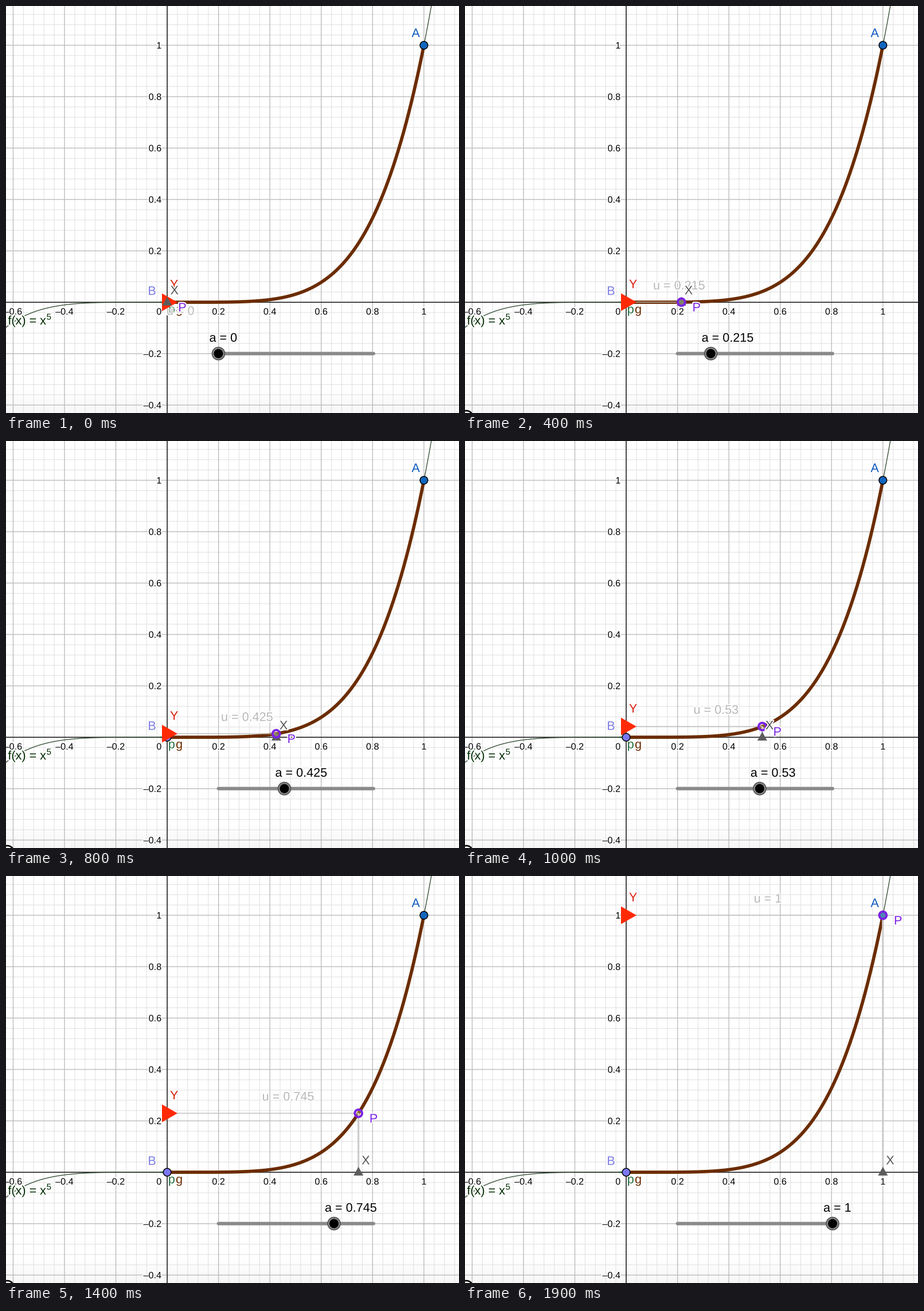
These frames come from a looping animation (790x709 px, 2 s). A matplotlib script:

```python
import numpy as np
import matplotlib.pyplot as plt
from matplotlib.animation import FuncAnimation
from matplotlib.patches import Circle, Polygon
from matplotlib.patheffects import withStroke

W, H = 790, 709
PT = 0.72                      # points per pixel at 100 dpi
OX, OY, UNIT = 281.1, 516.1, 447.7
BROWN, PURPLE = "#6b2c00", "#7b22e4"
BIG, SMALL = 21.6, 16.2        # text sizes in pixels
RAIL_Y = 605.5

plt.rcParams["font.family"] = "Liberation Sans"
fig = plt.figure(figsize=(W / 100, H / 100), dpi=100, facecolor="white")
ax = fig.add_axes([0, 0, 1, 1])
ax.axis("off")


def sx(x):
    return OX + UNIT * x


def sy(y):
    return OY - UNIT * y


def line(xs, ys, color, width, z, cap="butt"):
    # no snapping: lines keep their place between pixels
    return ax.plot(xs, ys, color=color, lw=width * PT, zorder=z,
                   solid_capstyle=cap, snap=False)[0]


def label(x, y, s, color, z, size=BIG, **kw):
    halo = [withStroke(linewidth=4 * PT, foreground="white")]
    return ax.text(x, y, s, color=color, fontsize=size * PT, zorder=z,
                   path_effects=halo, **kw)


def disc(x, y, r, face, edge, width, z):
    return ax.add_patch(Circle((x, y), r, fc=face, ec=edge, lw=width * PT, zorder=z))


def triangle(color, z):
    return ax.add_patch(Polygon(np.zeros((3, 2)), fc=color, ec="none", zorder=z))


def draw_grid():
    shade = np.linspace(1, 0.968, 45)[:, None, None] * np.ones((1, 1, 3))
    ax.imshow(shade, extent=(0, W, H, H - 45), aspect="auto", zorder=0)
    for k in range(-16, 30):
        major = k % 5 == 0
        color, width, z = ("#b9b9b9", 1.3, 2) if major else ("#e0e0e0", 1, 1)
        v = k * 0.04
        line([sx(v)] * 2, [0, H], color, width, z)
        line([0, W], [sy(v)] * 2, color, width, z)
    line([OX, OX], [0, H], "black", 1.3, 3)
    line([0, W], [OY, OY], "black", 1.3, 3)


def draw_ticks():
    for k in range(-3, 6):
        v = k / 5
        s = f"{v:g}".replace("-", "\u2013")
        if k:
            label(sx(v), 537.6, s, "black", 4, SMALL, ha="center")
        else:
            label(271.3, 537.6, s, "black", 4, SMALL, ha="right")
        if k and k > -3:
            label(271.3, sy(v) + 5.7, s, "black", 4, SMALL, ha="right")


def draw_curve():
    x = np.linspace(-0.66, 1.06, 500)
    line(sx(x), sy(x ** 5), "#2f4a30", 1.3, 5)
    label(3.4, 554.9, "f(x) = x", "#002a00", 6)
    label(70.6, 546.4, "5", "#002a00", 6, 15)
    x = np.linspace(0, 1, 300)
    line([269, OX], [OY, OY], "#24603a", 2.6, 6)
    line(sx(x), sy(x ** 5), BROWN, 5.7, 6)


draw_grid()
draw_ticks()
draw_curve()

label(282.8, 535.3, "p", "#23703f", 7)
label(296.1, 535.3, "g", BROWN, 7)
label(707.4, 54.1, "A", "#0f5abf", 13)
label(247.4, 503.3, "B", "#7d7de6", 13)
disc(OX, OY, 6.8, "#7b78f5", "black", 1.5, 9)
disc(sx(1), sy(1), 6.8, "#1166bf", "black", 1.5, 9)

u_seg = line([], [], "#bdbdbd", 1.4, 7)
x_seg = line([], [], "#cccccc", 3.2, 7)
u_text = label(0, 0, "", "#b8b8b8", 8)
y_mark, x_mark = triangle("#ff2a05", 10), triangle("#5c5c5c", 11)
p_mark = disc(0, 0, 6.4, (0.85, 0.85, 0.6, 0.3), PURPLE, 3.8, 12)
y_text = label(0, 0, "Y", "#d81e0c", 13)
x_text = label(0, 0, "X", "#555555", 13)
p_text = label(0, 0, "P", PURPLE, 14)

line([370.5, 641], [RAIL_Y, RAIL_Y], "#8a8a8a", 6, 8, "round")
knob = disc(0, RAIL_Y, 11, "#8a8a8a", "#505050", 1.6, 9)
core = disc(0, RAIL_Y, 8, "black", "none", 0, 10)
a_text = label(0, 584.8, "", "black", 13)
corner = disc(2.5, 716, 11, "none", "black", 2.6, 13)

ax.set_xlim(0, W)
ax.set_ylim(H, 0)

STEPS = [0, 4, 8, 12, 14, 17, 19]
VALUES = [0, 0.215, 0.425, 0.64, 0.745, 0.895, 1]


def update(i):
    a = round(np.interp(i, STEPS, VALUES) / 0.005) * 0.005
    px, py = sx(a), sy(a ** 5)

    u_seg.set_data([OX, px], [py, py])
    x_seg.set_data([px, px], [OY, py])
    y_mark.set_xy([(272, py - 15.5), (272, py + 15.5), (299, py)])
    x_mark.set_xy([(px - 8.5, OY + 5.7), (px + 8.5, OY + 5.7), (px, OY - 9.5)])
    p_mark.center = px, py
    p_mark.set_visible(a > 0)

    y_text.set_position((286, py - 24.3))
    x_text.set_position((px + 5.5, 502.3))
    p_text.set_position((px + 19.2, py + 16.1))
    u_text.set_text(f"u = {a:.4g}")
    # a segment of zero length puts its label below the point
    u_text.set_position(((OX + px) / 2 - 1.2, py - 22.2 if a else 538))

    kx = 370.5 + 270.5 * a
    knob.center = core.center = kx, RAIL_Y
    a_text.set_text(f"a = {a:.4g}")
    a_text.set_x(kx - 16)
    corner.set_visible(i > 0)
    return []


anim = FuncAnimation(fig, update, frames=20, interval=100, repeat=True,
                     repeat_delay=0, init_func=lambda: update(0))
plt.show()
```
